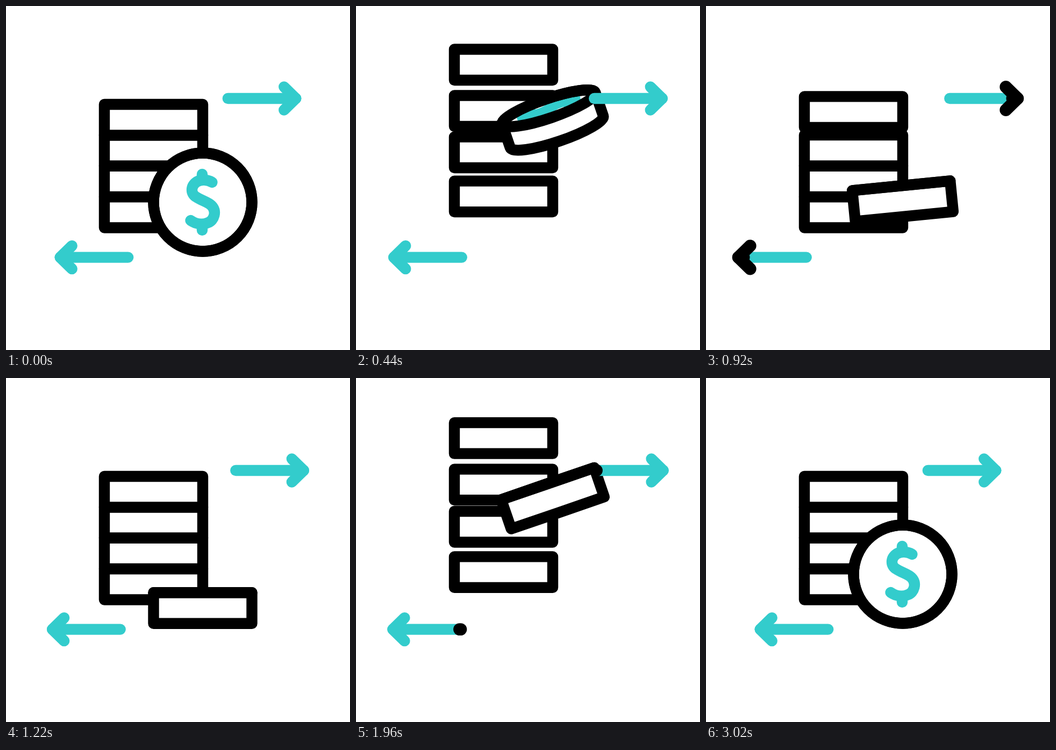
Animation, 640 px wide and 640 px high, one loop 3.2 s. Source, as an HTML page with a canvas:

```html
<!DOCTYPE html>
<html lang="en">
<head>
<meta charset="utf-8">
<title>Coin exchange</title>
<style>
  html, body { margin: 0; width: 100%; height: 100%; overflow: hidden; background: #fff; }
  canvas { display: block; }
</style>
</head>
<body>
<canvas id="stage" width="640" height="640"></canvas>
<script>
const ctx = document.getElementById('stage').getContext('2d');
const TEAL = '#33cccc', BLACK = '#000';
const LOOP = 3200, HALF = 1500, LINE = 20.4;
const R = 91.5, THICK = 57.5;

// Eased progress from 0 to 1 between two times
function ease(t, a, b) {
  const u = Math.min(1, Math.max(0, (t - a) / (b - a)));
  return u * u * (3 - 2 * u);
}
const mix = (a, b, p) => a + (b - a) * p;

function stroke(color, width = LINE) {
  ctx.strokeStyle = color;
  ctx.lineWidth = width;
  ctx.stroke();
}

// Stacked coins: lift height and the moment each lands, top to bottom
const stack = [
  { y: 183, lift: 113, land: 1104 },
  { y: 240, lift: 86, land: 926 },
  { y: 297.5, lift: 73, land: 746 },
  { y: 355, lift: 66, land: 573 }
];

function drawStack(t) {
  for (const c of [...stack].reverse()) {
    const up = c.lift * (ease(t, 0, 255) - ease(t, 286, c.land));
    ctx.beginPath();
    ctx.rect(183, c.y - up, 183, THICK);
    ctx.fillStyle = '#fff';
    ctx.fill();
    stroke(BLACK);
  }
}

// Centre height, turn in degrees and openness of the face (1 = full circle)
function coinPose(t, second) {
  const rise = ease(t, 0, 440);
  if (!second) {
    const fall = ease(t, 440, 1195);
    return {
      y: mix(mix(365, 212.3, rise), 428, fall),
      turn: mix(71.1 * rise, 90, fall),
      open: 1 - ease(t, 0, 615)
    };
  }
  const fall = ease(t, 440, 1247);
  return {
    y: mix(mix(428, 223.5, rise), 365, fall),
    turn: mix(mix(90, 71.2, rise), 0, fall),
    open: fall
  };
}

function dollar() {
  ctx.moveTo(17.5, -37);
  ctx.bezierCurveTo(9, -42, -3, -43, -11, -38);
  ctx.bezierCurveTo(-23, -30, -23, -15, -11, -9);
  ctx.bezierCurveTo(-2, -3, 10, 0, 16, 6);
  ctx.bezierCurveTo(27, 17, 21, 34, 10, 38);
  ctx.bezierCurveTo(1, 42, -11, 42, -22.5, 34);
  ctx.moveTo(-1, -52);
  ctx.lineTo(-1, -41);
  ctx.moveTo(-1, 41);
  ctx.lineTo(-1, 52);
}

function drawCoin({ y, turn, open }) {
  const d = THICK * (1 - open) / 2, b = R * open, q = Math.PI / 2;
  ctx.save();
  ctx.translate(366, y);
  ctx.rotate(turn * Math.PI / 180);

  const body = new Path2D();
  body.ellipse(-d, 0, b, R, 0, q, 3 * q);
  body.ellipse(d, 0, b, R, 0, -q, q);
  body.closePath();
  const face = new Path2D();
  face.ellipse(-d, 0, b, R, 0, 0, 4 * q);

  ctx.fillStyle = '#fff';
  ctx.fill(body);

  // The sign is squeezed with the face but keeps its line weight
  if (open > 0.02) {
    ctx.save();
    ctx.translate(-d, 0);
    ctx.scale(open, 1);
    ctx.beginPath();
    dollar();
    ctx.restore();
    stroke(TEAL);
  }

  ctx.strokeStyle = BLACK;
  ctx.lineWidth = LINE;
  ctx.stroke(body);
  ctx.stroke(face);
  ctx.restore();
}

const SHAFT = 126.5, ARM = Math.hypot(22, 21.5), TOTAL = SHAFT + 2 * ARM;

// Strokes the part of a line between two lengths along it
function part(points, len, from, to, color, width) {
  const a = Math.max(0, from), b = Math.min(len, to);
  if (b - a < 0.05) return;
  ctx.beginPath();
  points.forEach(([x, y]) => ctx.lineTo(x, y));
  if (b - a < len) {
    ctx.setLineDash([b - a, 999]);
    ctx.lineDashOffset = -a;
  }
  stroke(color, width);
  ctx.setLineDash([]);
}

function drawArrow(x, y, dir, from, to) {
  const shaft = [[0, 0], [SHAFT, 0]];
  const head = [[SHAFT - 22, 21.5], [SHAFT, 0], [SHAFT - 22, -21.5]];
  const trace = (a, b, color, width) => {
    part(shaft, SHAFT, a, b, color, width);
    part(head, 2 * ARM, a - SHAFT, b - SHAFT, color, width);
  };
  ctx.save();
  ctx.translate(x, y);
  ctx.scale(dir, 1);
  trace(0, TOTAL, TEAL, LINE);
  if (to > from) trace(from * TOTAL, to * TOTAL, BLACK, 22.8);
  ctx.restore();
}

function draw(time) {
  const second = time >= HALF;
  const t = second ? time - HALF : time;
  const shift = 48 * (ease(t, 0, 745) - ease(t, 725, 1505));
  const from = ease(t, 740, 1050), to = ease(t, 440, 740);

  ctx.fillStyle = '#fff';
  ctx.fillRect(0, 0, 640, 640);
  ctx.lineCap = ctx.lineJoin = 'round';
  drawStack(t);
  drawCoin(coinPose(t, second));
  drawArrow(412.8 + shift, 172, 1, from, to);
  drawArrow(227.2 - shift, 467.6, -1, from, to);
}

const start = performance.now();
function tick() {
  const t = (performance.now() - start) % LOOP;
  draw(Math.floor(t / 20) * 20);
  requestAnimationFrame(tick);
}
tick();
</script>
</body>
</html>
```
